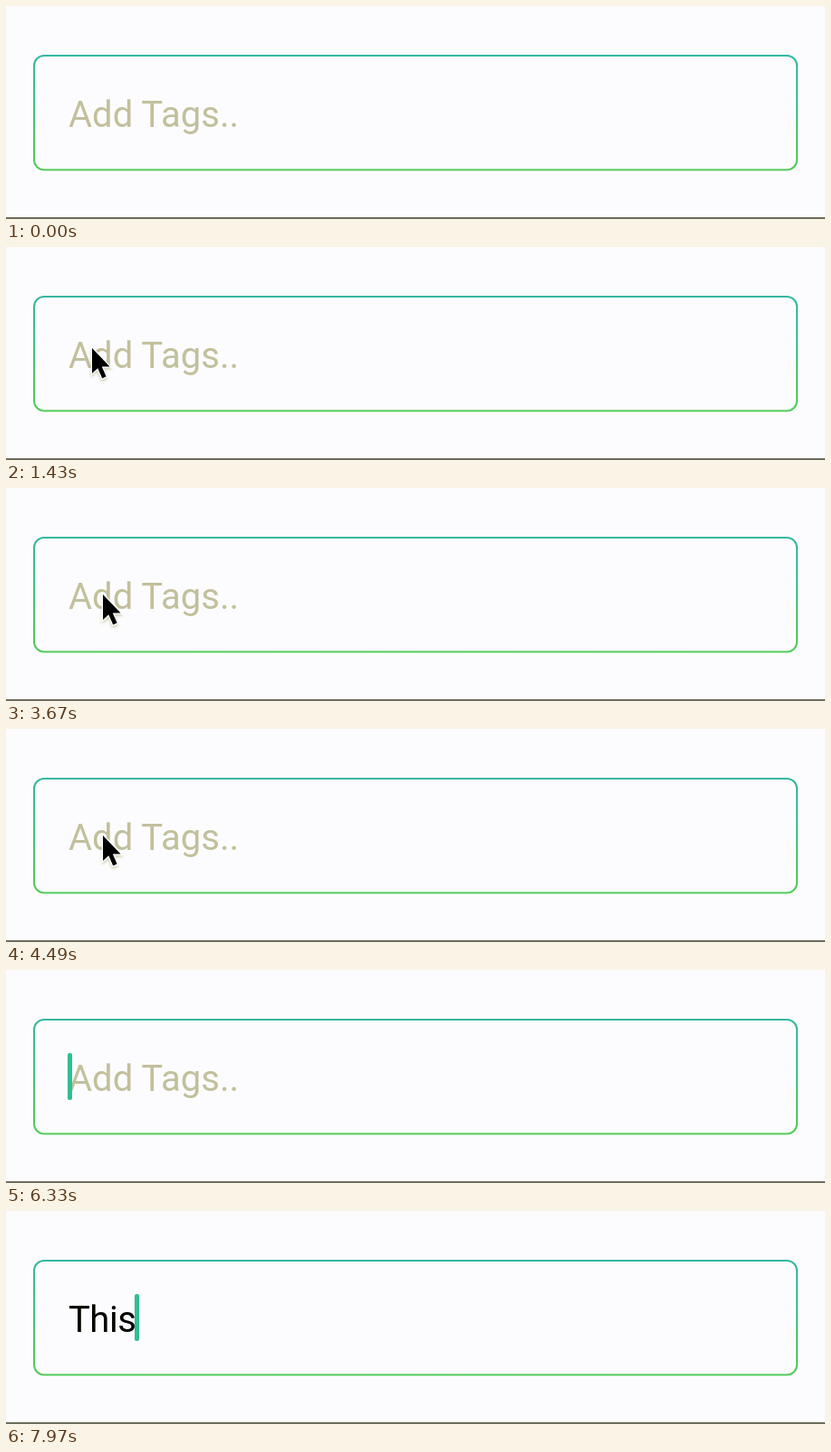
Recreate the animation shown at these times as an HTML page. Size 904 by 236 pixels, loop 8000 ms.

```html
<!DOCTYPE html>
<html lang="en">
<head>
<meta charset="utf-8">
<title>Tag input</title>
<style>
  html, body { margin: 0; width: 100%; height: 100%; overflow: hidden; background: #fcfcfe; }
  svg { display: block; width: 904px; height: 236px; }
  text { font: 40px Roboto, sans-serif; }
  #typed { letter-spacing: -.5px; }
</style>
</head>
<body>
<svg viewBox="0 0 904 236">
  <defs>
    <linearGradient id="edge" x1="0" y1="0" x2="0" y2="1">
      <stop offset="0" stop-color="#36b8a0"/>
      <stop offset="1" stop-color="#52cc58"/>
    </linearGradient>
    <filter id="shadow" x="-50%" y="-50%" width="200%" height="200%">
      <feDropShadow dx="0" dy="2" stdDeviation="1.5" flood-color="#8a8a30" flood-opacity=".4"/>
    </filter>
  </defs>
  <rect width="904" height="236" fill="#fcfcfe"/>
  <rect y="234" width="904" height="2" fill="#6c6c5c"/>
  <rect x="31" y="55" width="842" height="126.5" rx="11" fill="none" stroke="url(#edge)" stroke-width="2"/>
  <text id="placeholder" x="69" y="134" fill="#c2c09c">Add Tags..</text>
  <text id="typed" x="69" y="134" fill="#050500"></text>
  <rect id="caret" x="68" y="92" width="5" height="52" rx="2" fill="#2fbe92"/>
  <circle id="press" cx="107" cy="120" fill="#000"/>
  <path id="pointer" d="M0 0V28L6.3 22.3L11.2 33.5L15.6 31.6L10.8 20.6H19.5Z"
        fill="#000" stroke="#fff" stroke-width="2.5" paint-order="stroke" filter="url(#shadow)"/>
</svg>
<script>
const LOOP = 8000;
const FOCUS = 2190, BLINK = 2690, POINTER_HIDE = 4750;
const keys = [[6850, "T"], [7530, "Th"], [7690, "Thi"], [7850, "This"]];
const path = [[20, 18, 190], [730, 42, 117], [830, 42, 117], [1430, 95, 112], [1530, 95, 112], [1670, 107, 118]];

const [placeholder, typed, caret, press, pointer] =
  ["placeholder", "typed", "caret", "press", "pointer"].map(id => document.getElementById(id));
const show = (el, on) => el.setAttribute("visibility", on ? "visible" : "hidden");
const ramp = (t, from, to) => Math.min(1, Math.max(0, (t - from) / (to - from)));
const smooth = u => u * u * (3 - 2 * u);

function pointerAt(t) {
  let [, x, y] = path[0];
  for (let i = 1; i < path.length; i++) {
    const u = smooth(ramp(t, path[i - 1][0], path[i][0]));
    x += (path[i][1] - path[i - 1][1]) * u;
    y += (path[i][2] - path[i - 1][2]) * u;
  }
  return [x, y];
}

// Stepped blink: out, short gap, quickly back in, short hold.
function blink(ms) {
  const p = ms % 420;
  if (p < 160) return .75 - .25 * Math.min(3, Math.floor(p / 40));
  if (p < 280) return 0;
  return Math.min(1, .5 + .25 * Math.floor((p - 280) / 20));
}

function caretAlpha(t) {
  if (t < FOCUS) return 0;
  if (t < BLINK) return 1;
  if (t < keys[0][0]) return blink(t - BLINK + 40);
  if (t >= 7310 && t < keys[1][0]) return blink(t - 7310);
  return 1;
}

function draw(t) {
  const word = keys.reduce((text, [at, next]) => t >= at ? next : text, "");
  if (typed.textContent !== word) typed.textContent = word;
  show(placeholder, !word);
  caret.setAttribute("x", 68 + (word ? Math.round(typed.getComputedTextLength()) : 0));
  caret.setAttribute("opacity", caretAlpha(t));

  const grow = ramp(t, 1650, 1850);
  press.setAttribute("r", 45 * smooth(grow));
  press.setAttribute("opacity", .12 * grow * (1 - ramp(t, 2090, 2250)));

  show(pointer, t >= 20 && t < POINTER_HIDE);
  pointer.setAttribute("transform", `translate(${pointerAt(t)})`);
}

const start = performance.now();
function tick() {
  draw((performance.now() - start) % LOOP);
  requestAnimationFrame(tick);
}
tick();
</script>
</body>
</html>
```
